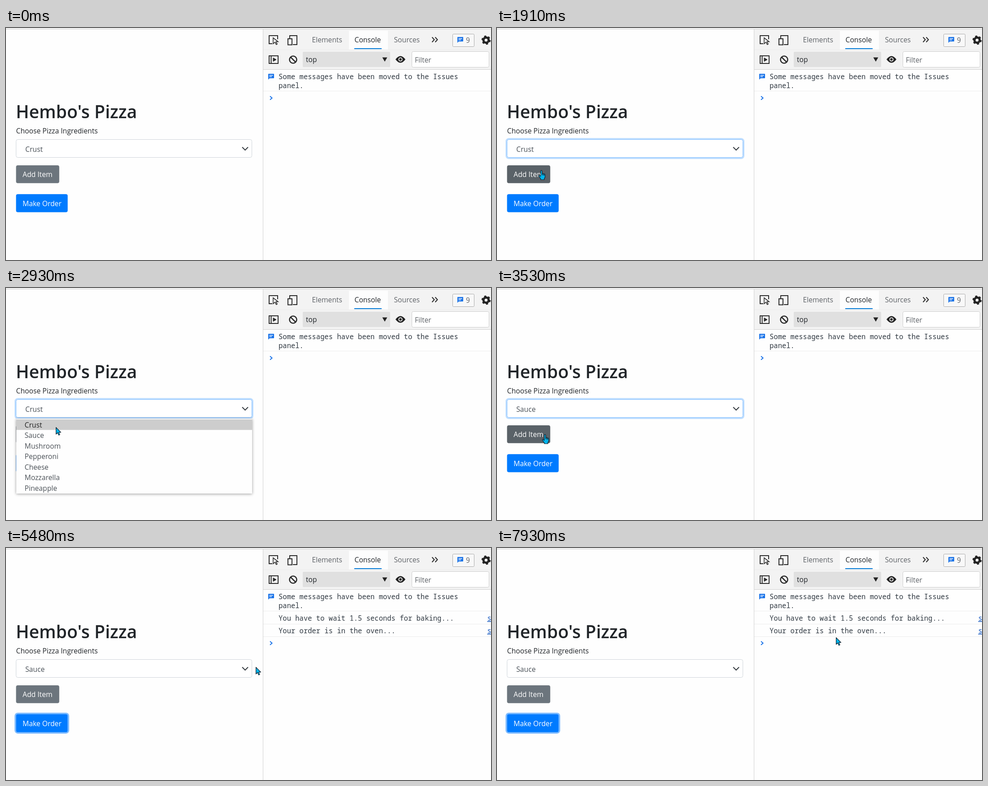
An HTML page for the animation above (8 s loop, 1082 px wide and 517 px high).

```html
<!DOCTYPE html>
<html lang="en">
<head>
<meta charset="utf-8">
<title>Pizza order form with console</title>
<style>
  html, body { margin: 0; width: 100%; height: 100%; overflow: hidden; background: #fefefe; }
  svg { display: block; width: 1082px; height: 517px; }
  text { font: 15.7px "Open Sans", "Noto Sans", sans-serif; fill: #212529; white-space: pre; }
  .title { font-size: 39.2px; font-weight: 600; }
  .field { fill: #495057; }
  .light { fill: #fff; }
  .tab { fill: #5f6368; }
  .mono text { font: 15.54px "Noto Sans Mono", "DejaVu Sans Mono", monospace; fill: #303942; }
  .mono .link { fill: #1558c0; text-decoration: underline; }
  .icon { fill: none; stroke: #2b2b2b; stroke-width: 2; }
  .line { fill: none; stroke: #ececec; }
  .ring { fill: none; stroke-width: 3.4; }
  #popup > .sheet { fill: #fefefe; filter: drop-shadow(0 1px 3px rgba(0, 0, 0, .4)); }
  #popup text { fill: #4c5258; }
  #popup text.on { fill: #222; }
  .pointer { fill: #00b4ec; stroke: #15202b; stroke-width: 1.2; stroke-linejoin: round; }
</style>
</head>
<body>
<svg viewBox="0 0 1082 517">
  <defs>
    <g id="bubble">
      <path d="M1 0H12Q13 0 13 1V9Q13 10 12 10H3L0 13V1Q0 0 1 0Z" fill="#1a73e8"/>
      <path d="M2.5 3.5H10.5M2.5 6.5H8" stroke="#fff" stroke-width="1.3"/>
    </g>
  </defs>
  <rect width="1082" height="517" fill="#fefefe"/>

  <!-- order form -->
  <text class="title" x="22" y="200.5">Hembo's Pizza</text>
  <text x="22.5" y="234.5">Choose Pizza Ingredients</text>
  <rect id="selectRing" class="ring" x="20.8" y="246.9" width="529.4" height="43.4" rx="5.5" stroke="#bfdeff"/>
  <rect id="select" x="22.5" y="248.5" width="526" height="40" rx="4" fill="#fff"/>
  <text id="value" class="field" x="43" y="276"></text>
  <path class="icon" d="M527 265.5l6.5 6.5 6.5-6.5" style="stroke: #343a40"/>
  <rect id="addRing" class="ring" x="20.8" y="304.3" width="99.7" height="43" rx="5.5" stroke="#bec2c6"/>
  <rect id="add" x="22.4" y="306" width="96.4" height="39.8" rx="4"/>
  <text class="light" x="37" y="332">Add Item</text>
  <rect id="orderRing" class="ring" x="20.8" y="368.6" width="118.5" height="43.4" rx="5.5" stroke="#7fbcff"/>
  <rect id="order" x="22.4" y="370.2" width="115.2" height="40.2" rx="4"/>
  <text class="light" x="37" y="397">Make Order</text>
  <g id="popup">
    <rect class="sheet" x="23" y="291" width="526" height="167"/>
    <rect id="mark" x="23" width="526" height="23.6" fill="#cdcdcd"/>
  </g>

  <!-- devtools bars -->
  <rect width="1082" height="2" fill="#f7f7f7"/>
  <rect x="574" y="3" width="508" height="89" fill="#f3f3f3"/>
  <rect x="765" y="6" width="87" height="42" fill="#fdfdfd"/>
  <rect x="777" y="45" width="61" height="2" fill="#0078d4"/>
  <path class="line" d="M574 48.5H1082"/>
  <path d="M0 2.5H1082M573.5 3V517M574 92.5H1082" stroke="#d0d0d0"/>
  <text class="tab" x="682.5" y="32">Elements</text>
  <text x="777.5" y="32">Console</text>
  <text class="tab" x="865.5" y="32">Sources</text>

  <g class="icon">
    <path d="M594 35H587V17H606V25"/>
    <path d="M596 22V35L600 31.5 603 37 605 36 602.5 30.5H607Z" fill="#fff" stroke-width="1.6"/>
    <path d="M633 23V17H649V37H640"/>
    <rect x="629" y="24" width="9" height="13.5"/>
    <path d="M950.5 20.5l5 5.5-5 5.5M957.5 20.5l5 5.5-5 5.5"/>
    <path d="M587 62H607V79H587ZM591.5 62V79"/>
    <path d="M596 66.5L603 70.5 596 74.5Z" fill="#2b2b2b" stroke-width="1"/>
    <circle cx="640.5" cy="70.5" r="8" stroke-width="2.6"/>
    <path d="M635 65L646 76" stroke-width="2.6"/>
  </g>
  <rect x="662" y="53" width="195" height="34" rx="2" fill="#e0e0e0"/>
  <text x="669" y="76">top</text>
  <path d="M839.5 65.5H850.5L845 75Z" fill="#222"/>
  <path d="M869 70Q880 55 891 70Q880 85 869 70Z" fill="#222"/>
  <circle cx="880" cy="70" r="4.6" fill="#f3f3f3"/>
  <circle cx="880" cy="70" r="2.8" fill="#222"/>
  <rect x="905.5" y="52.5" width="172" height="35" rx="3" fill="#fff" stroke="#ccc"/>
  <text class="tab" x="912" y="77">Filter</text>
  <rect x="996.5" y="13.5" width="48" height="28" rx="2" fill="#f8f8f8" stroke="#aaa"/>
  <use href="#bubble" x="1007" y="20"/>
  <text class="tab" x="1026" y="33">9</text>
  <g fill="none" stroke="#222">
    <circle cx="1071" cy="27" r="5.8" stroke-width="5"/>
    <circle cx="1071" cy="27" r="8.7" stroke-width="3" stroke-dasharray="4.555"/>
  </g>

  <!-- console -->
  <use href="#bubble" x="585" y="102"/>
  <g class="mono">
    <text x="608" y="114">Some messages have been moved to the Issues</text>
    <text x="608" y="134">panel.</text>
    <path class="line" d="M574 140.5H1082"/>
    <g id="log">
      <text x="608" y="162">You have to wait 1.5 seconds for baking...</text>
      <text class="link" x="1073.5" y="162">s</text>
      <text x="608" y="190">Your order is in the oven...</text>
      <text class="link" x="1073.5" y="190">s</text>
      <path class="line" d="M574 169.5H1082M574 197.5H1082"/>
    </g>
    <path id="prompt" d="M589 -4l4.500 4-4.500 4" fill="none" stroke="#1a73e8" stroke-width="2"/>
  </g>

  <g id="cursor" class="pointer">
    <path id="arrow" d="M.6 .6V15.8L4.2 12.5 6.6 18 9 17 6.7 11.6H11.5Z"/>
    <path id="hand" d="M-1.6 10V1.2Q-1.6 -.6 0 -.6T1.6 1.2V6.5Q2.8 5 4 7Q5.4 5.8 6.3 7.6Q8.3 6.8 8.3 9.2V13Q8.3 16 6.5 17.5V20H-1.5V18Q-4 15.5 -5.7 11.5Q-5.5 9.5 -3.8 10.3L-1.6 12.5ZM1.6 6.5V10M4 7V10.5M6.3 7.6V11"/>
  </g>
</svg>
<script>
const LOOP = 8000;
const STEP = 77.35;   // the screen refreshes at this pace
const ENTER = 130;    // the cursor comes into view
const ROW = 23.5;

// clicks, in order
const PICK_CRUST = 1590, ADD_CRUST = 2140, PICK_SAUCE = 3360, ADD_SAUCE = 3900, ORDER = 4750;
const OPEN_FIRST = 800, OPEN_AGAIN = 2670;

// where the cursor goes; it rests between moves
const MOVES = [
  { from: 130, to: 520, x: 134, y: 265 },
  { from: 670, to: 1210, x: 102, y: 293 },
  { from: 1680, to: 1900, x: 99, y: 318 },
  { from: 2220, to: 2530, x: 112, y: 275 },
  { from: 2610, to: 3080, x: 110, y: 329 },
  { from: 3450, to: 3690, x: 100, y: 322 },
  { from: 4070, to: 4455, x: 98, y: 387 },
  { from: 5100, to: 5470, x: 561, y: 264 },
  { from: 5470, to: 5930, x: 783, y: 177 },
  { from: 5930, to: 6090, x: 799, y: 162 },
  { from: 6090, to: 6390, x: 781, y: 163 },
  { from: 7010, to: 7400, x: 738, y: 190 },
  { from: 7400, to: 7920, x: 758, y: 200 }
];

const $ = id => document.getElementById(id);
const set = (id, name, value) => $(id).setAttribute(name, value);
const show = (id, on) => set(id, "visibility", on ? "visible" : "hidden");
const between = (t, a, b) => t >= a && t < b;

const items = "Crust Sauce Mushroom Pepperoni Cheese Mozzarella Pineapple".split(" ").map((word, i) => {
  const item = document.createElementNS("http://www.w3.org/2000/svg", "text");
  item.textContent = word;
  item.setAttribute("x", 41.5);
  item.setAttribute("y", 310.5 + i * ROW);
  $("popup").append(item);
  return item;
});

function cursorAt(t) {
  let x = 791, y = 443;
  for (const move of MOVES) {
    const k = Math.min(1, Math.max(0, (t - move.from) / (move.to - move.from)));
    x += (move.x - x) * k;
    y += (move.y - y) * k;
  }
  return [Math.round(x), Math.round(y)];
}

function draw(time) {
  const t = ENTER + Math.floor((time - ENTER + 10) / STEP) * STEP;
  const inView = time >= ENTER;
  const [x, y] = cursorAt(t);
  const open = between(t, OPEN_FIRST, PICK_CRUST) || between(t, OPEN_AGAIN, PICK_SAUCE);
  const focus = between(t, OPEN_FIRST, ADD_CRUST) || between(t, OPEN_AGAIN, ADD_SAUCE);
  const added = between(t, ADD_CRUST, OPEN_AGAIN) || between(t, ADD_SAUCE, ORDER);
  const ordered = t >= ORDER;
  const over = (right, top, bottom) =>
    inView && !open && between(x, 23, right) && between(y, top, bottom);
  const onAdd = over(119, 306, 346), onOrder = over(138, 370, 411);

  show("selectRing", focus);
  set("select", "stroke", focus ? "#80bdff" : "#ced4da");
  $("value").textContent = t < PICK_SAUCE ? "Crust" : "Sauce";
  show("addRing", added);
  show("orderRing", ordered);
  set("add", "fill", onAdd ? "#5a6268" : "#6c757d");
  set("order", "fill", onOrder && y > 376 ? "#0069d9" : "#007bff");

  show("popup", open);
  const row = y > 316 ? 1 : 0;
  set("mark", "y", 292.7 + row * ROW);
  items.forEach((item, i) => item.classList.toggle("on", i === row));

  show("log", ordered);
  set("prompt", "transform", `translate(0 ${ordered ? 212 : 156})`);

  const hand = onAdd || onOrder;
  set("cursor", "transform", `translate(${x} ${y})`);
  show("arrow", inView && !hand);
  show("hand", hand);
}

const start = performance.now();
function tick() {
  draw((performance.now() - start) % LOOP);
  requestAnimationFrame(tick);
}
tick();
</script>
</body>
</html>
```
